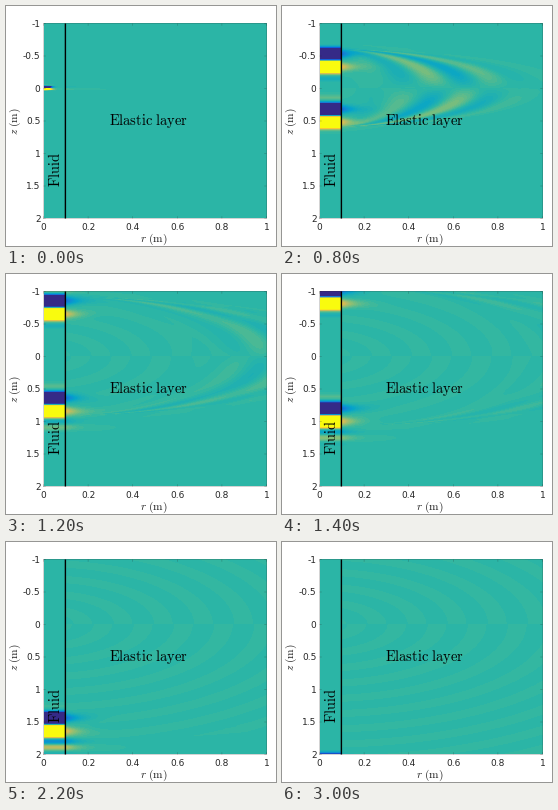
Animation, 270 px wide and 240 px high, one loop 3100 ms. Source, as a matplotlib script:

```python
import numpy as np
import matplotlib.pyplot as plt
from matplotlib.animation import FuncAnimation
from matplotlib.colors import LinearSegmentedColormap

W, H, DPI = 270, 240, 100
PX = 72 / DPI                       # points per pixel
LEFT, RIGHT, TOP, BOTTOM = 37.5, 260.5, 17.5, 212.5
FRAMES, INTERVAL = 31, 100
WALL = 0.1                          # fluid radius in m
INK = "#262626"

plt.rcParams["mathtext.fontset"] = "cm"
plt.rcParams["font.family"] = "DejaVu Sans"

CMAP = LinearSegmentedColormap.from_list("sea", [
    "#352a87", "#0f5cdd", "#1481d6", "#06a4ca", "#2eb7a4",
    "#87bf77", "#d1bb59", "#fec832", "#f9fb0e"], N=64)

r, z = np.meshgrid((np.arange(223) + 0.5) / 223,
                   -1 + 3 * (np.arange(195) + 0.5) / 195)
outside = np.maximum(r - WALL, 0)


def bump(u, center, width):
    return np.exp(-((u - center) / width) ** 2)


def doublet(u, width):
    return bump(u, 0.1, width) - bump(u, -0.1, width)


def precursor(u, n):
    """Short ripples that slowly grow ahead of the guided wave."""
    grow = np.clip((n - 8) / 10, 0, 1)
    return 0.5 * grow * np.cos(2 * np.pi * (u - 0.36) / 0.23) \
        * bump(u, 0.31, 0.11)


def pulse(u, n):
    """Guided wave in the fluid; u is the distance ahead of its centre."""
    tail = 0.2 * (1 - n / 30) * bump(u, -0.28, 0.04)
    return 6 * doublet(u, 0.066) + precursor(u, n) + tail


def wall_wave(u, n):
    """Part of the guided wave that leaks through the wall."""
    return 0.6 * doublet(u, 0.06) + precursor(u, n)


def both_ways(shape, c, k, n):
    return shape((z - c) / k, n) - shape((-z - c) / k, n)


def body_waves(c, n):
    """Curved fronts fanning out from the two guided pulses."""
    inside = np.sqrt(np.clip(1 - (z / (c + 0.18)) ** 2, 1e-4, 1))
    x = r / inside - (0.65 + 0.115 * (n - 8))
    rings = np.cos(np.pi * x / 0.14) * bump(x, -0.08, 0.28)
    amp = 0.38 * np.exp(-max(n - 7, 0) / 3.6) * min(1, n / 6) ** 2
    near = 1 - np.exp(-outside / 0.12)
    return amp * rings * near * inside ** 0.5 * np.tanh(5 * z)


def ripples(c, n):
    """Weak bands left behind the fronts."""
    path = np.hypot(r, 0.77 * z)
    grow = np.clip((n - 6) / 4, 0, 1)
    reached = np.hypot(0.75 * r, z) < c + 0.25
    return 0.018 * grow * reached * np.sign(z) \
        * np.sin(2 * np.pi * (path - 0.1 * n) / 0.18)


def field(n):
    c = max(0, 0.08 * (n - 2.67))
    k = min(1, 0.17 + 0.2 * n)
    reach = 0.015 + 0.03 * n
    spread = 1 / (1 + np.exp(np.clip((r - reach) / 0.008, -50, 50)))
    fluid = both_ways(pulse, c, k, n) * spread
    leak = np.exp(-outside / 0.05) * min(1, 0.08 + n / 6)
    solid = (both_ways(wall_wave, c, k, n) * leak
             + body_waves(c, n) + ripples(c, n))
    return np.clip(np.where(r < WALL, fluid, solid) - 0.002, -1, 1)


fig = plt.figure(figsize=(W / DPI, H / DPI), dpi=DPI, facecolor="white")
ax = fig.add_axes([0, 0, 1, 1])
ax.axis("off")
image = ax.imshow(field(0), cmap=CMAP, vmin=-1, vmax=1, aspect="auto",
                  extent=(LEFT, RIGHT, BOTTOM, TOP), interpolation="nearest")
ax.set_xlim(0, W)
ax.set_ylim(H, 0)


def line(xs, ys, width=0.5, color=INK, alpha=0.4):
    ax.plot(xs, ys, color=color, lw=width * PX, alpha=alpha,
            solid_capstyle="butt", snap=False)


def label(x, y, text, size, color=INK, **kw):
    ax.text(x, y, text, fontsize=size * PX, color=color, **kw)


line([LEFT, RIGHT, RIGHT, LEFT, LEFT], [TOP, TOP, BOTTOM, BOTTOM, TOP])
for v in np.arange(6) / 5:
    x = LEFT + v * (RIGHT - LEFT)
    line([x, x], [BOTTOM, BOTTOM - 2.2])
    line([x, x], [TOP, TOP + 2.2])
    label(x, 224.5, f"{v:g}", 9, ha="center", va="baseline")
for v in np.arange(-2, 5) / 2:
    y = TOP + (v + 1) * 65
    line([LEFT, LEFT + 2.2], [y, y])
    line([RIGHT, RIGHT - 2.2], [y, y])
    label(34.5, y + 3.3, f"{v:g}", 9, ha="right", va="baseline")

wall_x = LEFT + WALL * (RIGHT - LEFT) - 0.4
line([wall_x, wall_x], [TOP, BOTTOM], 1.4, "black", 1)
label(143, 118.5, r"$\mathrm{Elastic\ layer}$", 14.4, "black",
      ha="center", va="baseline")
label(49, 163.5, r"$\mathrm{Fluid}$", 14.4, "black",
      rotation=90, ha="center", va="center")
label(148, 235.5, r"$r\ \mathrm{(m)}$", 11.3, ha="center", va="baseline")
label(9, 115, r"$z\ \mathrm{(m)}$", 11.3, rotation=90,
      ha="center", va="center")


def update(n):
    image.set_data(field(n))
    return [image]


anim = FuncAnimation(fig, update, frames=FRAMES, interval=INTERVAL,
                     repeat=True, repeat_delay=0)
plt.show()
```
